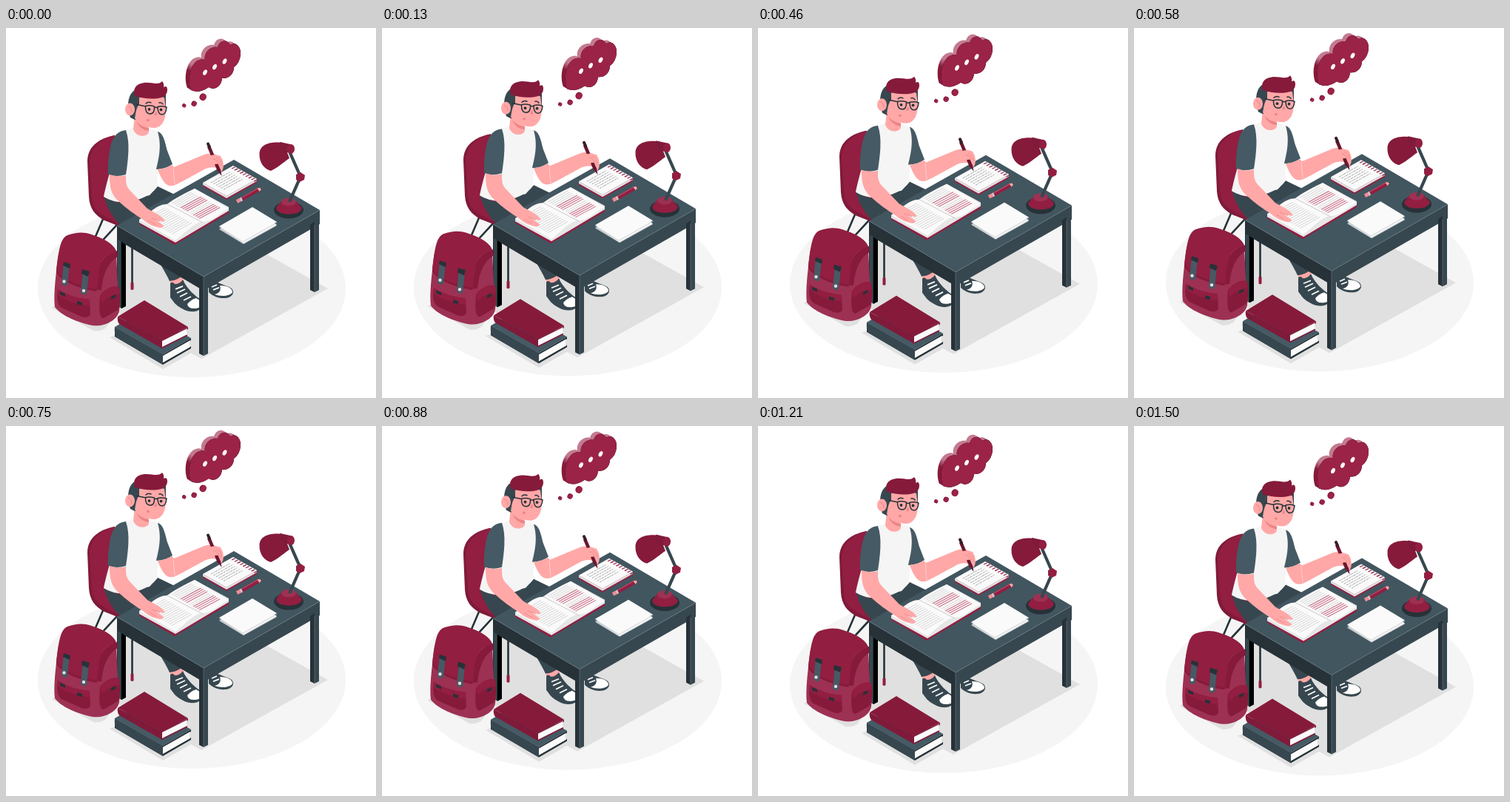
Recreate the animation shown at these times as an HTML page. Size 500 by 500 pixels, loop 1.54 s.

```html
<!DOCTYPE html>
<html lang="en">
<head>
<meta charset="utf-8">
<title>Studying at a desk</title>
<style>
  html, body { margin: 0; width: 100%; height: 100%; overflow: hidden; background: #fff; }
  svg { display: block; width: 100%; height: 100%; }
  .m { fill: #921e41; } .md { fill: #801a3a; } .ml { fill: #9d3153; } .mp { fill: #861a3b; }
  .g { fill: #455a64; } .gd { fill: #37474f; } .k { fill: #263238; }
  .w { fill: #fafafa; } .s { fill: #ffa8a7; } .sh { fill: #e0e0e0; }
  .line { fill: none; stroke: #263238; stroke-linecap: round; stroke-linejoin: round; }
</style>
</head>
<body>
<svg viewBox="0 0 500 500">
<defs>
  <linearGradient id="rim" x2="0" y2="1">
    <stop offset=".48" stop-color="#c47a90"/><stop offset=".62" stop-color="#861a3b"/>
  </linearGradient>
</defs>
<g id="scene">
  <ellipse cx="251" cy="352" rx="208" ry="120" fill="#f5f5f5"/>
  <path class="sh" d="M264 447L435 352 322 289 152 270V385ZM62 378L118 409Q126 411 134 406L172 354 120 340ZM140 418L212 461 254 437 190 400Z"/>

  <!-- chair -->
  <g class="line" stroke-width="2.6"><path d="M132 256L120 284M150 266L126 292M170.5 285V346"/></g>
  <path class="m" d="M168.500 344h4v9q-2 2-4 0Z"/>
  <path class="md" d="M147 145C126 149 110 160 110 180L112 228C113 244 120 253 133 260L156 269 165 240Z"/>
  <path class="m" d="M147 145C128 150 113 162 113 182L116 228C117 242 123 249 136 256L158 267 165 240Z"/>

  <!-- legs and shoes -->
  <path class="gd" d="M132 227L150 236 194 226 205 214 234 228 187 256 153 265Q138 250 132 227Z"/>
  <path class="gd" d="M203 310L233 325 238 337Q230 342 221 342Q216 331 203 310Z"/>
  <path class="s" d="M221 342Q231 341 238 335L240 343 224 348Z"/>
  <path class="gd" d="M274 342L283 342C290 347 300 348 305 352C310 358 305 364 297 365C287 366 279 362 274 357Z"/>
  <path fill="#fff" d="M289 348C300 348 306 352 306 357C303 363 289 363 282 360C289 358 291 354 289 348Z"/>
  <path class="gd" d="M222 345Q225 342 228 346Q235 346 239 340C244 352 256 363 265 368C268 376 263 382 255 383C245 385 233 377 228 372L222 364Z"/>
  <path fill="#fff" d="M245 373Q250 367 257 365L265 370C267 377 260 379 254 379Q246 379 245 373Z"/>
  <path stroke="#fff" stroke-width="1.800" d="M229 353l10-4M231 358l11-5M235 363l10-5M240 368l10-5M278 350l7-3M280 354l8-3"/>

  <!-- torso -->
  <path fill="#f5f5f5" d="M161 139L176 133Q183 142 192 135L206 140C213 155 205 185 204 215C196 226 182 232 166 235Q146 237 132 228C136 209 145 174 161 139Z"/>
  <path class="g" d="M205 140C213 142 215 155 218 166L225 184Q215 191 203 191C206 178 211 160 205 140Z"/>
  <path class="g" d="M162 138C148 140 143 149 140 166Q137 184 138 198Q150 202 162 198C165 178 168 155 162 138Z"/>

  <!-- desk -->
  <path class="k" d="M150 267L267 336V355L162 293V375L156 379 150 375Z"/>
  <path fill="#000" d="M156 289L162 293V376L156 379Z"/>
  <path class="gd" d="M151 286L155 288V378L151 376Z"/>
  <path class="gd" d="M267 336L424 246V265L267 355ZM267 350L273 347V440L267 443ZM417 262L423 259V354L417 357Z"/>
  <path class="k" d="M261 347L267 350V443L261 440ZM411 266L417 262V357L411 354Z"/>
  <path fill="#425660" d="M150 267L308 178 424 246 267 336Z"/>
  <path fill="none" stroke="#6d7d85" stroke-width=".6" d="M150 267L267 336 424 246M267 336V443M417 266V356"/>

  <!-- open book -->
  <path class="m" d="M180 262L255 219 301 246V250L228 293 180 265Z"/>
  <path fill="#e6e6e6" d="M180 259L255 217 301 242V247L229 290 180 263Z"/>
  <path class="w" d="M180 259C194 251 203 238 218 238C228 230 244 222 255 217L301 244C287 251 278 262 266 262C254 262 240 279 229 287Z"/>
  <path fill="none" stroke="#bdbdbd" stroke-width=".8" d="M218 238L266 263"/>
  <g id="pages"></g>

  <!-- loose sheets -->
  <path fill="#c9ced1" d="M288 272L333 245 366 267 321 292Z"/>
  <path fill="#f5f5f5" d="M290 270L334 244 366 266 321 291Z"/>
  <path fill="none" stroke="#c4c8ca" stroke-width=".7" d="M288 269L320 289 366 263"/>
  <path class="w" d="M288 268L333 242 366 262 320 288Z"/>

  <!-- notepad and pencil -->
  <path class="m" d="M266 211L306 188 339 207V209L298 232 266 214Z"/>
  <path fill="#e0e0e0" d="M266 209L298 227 339 204V207L298 230 266 212Z"/>
  <path class="w" d="M266 209L307 186 339 204 298 227Z"/>
  <g id="notes"></g>
  <path stroke="#921e41" stroke-width="5" d="M318 231.500L341 218.500"/>
  <path stroke="#b94f6b" stroke-width="1.300" d="M317 230L340 217"/>
  <path stroke="#ed8d94" stroke-width="5" d="M312 234.500L318 231.500"/>
  <path stroke="#c9d0d3" stroke-width="5" d="M317 232L319 231"/>
  <path class="s" d="M339.500 216.500L347 215.500 342.500 221Z"/>
  <path class="k" d="M343.500 216L347 215.500 345 218Z"/>

  <!-- arms and pen -->
  <path class="s" d="M205 191Q216 190 224 185L227 188 268 171C277 168 287 171 292 177C295 184 294 191 291 195L285 189Q277 187 270 190C255 198 241 206 229 212C217 217 211 207 205 191Z"/>
  <path stroke="#ffd9d8" stroke-width=".8" d="M226 189L228 211"/>
  <path stroke="#6b1730" stroke-width="4.500" d="M274 160L288 193"/>
  <path stroke="#3a1d2b" stroke-width="4" stroke-linecap="round" d="M273 156.500L275 161"/>
  <path fill="#6b1730" d="M286 193L290 191 291.500 200Z"/>
  <path class="s" d="M273 174Q280 169 290 173Q295 181 292 192Q288 189 288 184Q281 183 278 188Q273 186 273 174Z"/>
  <path fill="none" stroke="#ed8587" stroke-width=".8" d="M280 177Q286 178 288 184M284 175Q291 178 291 186"/>
  <path class="s" d="M140 198Q151 202 162 199C162 209 162 214 168 220L191 244C200 249 211 254 215 261Q210 262 202 259L213 267Q213 270 208 270C198 268 192 265 185 259C174 252 163 244 152 234C141 224 140 213 140 198Z"/>
  <path fill="none" stroke="#ed8587" stroke-width=".8" d="M192 260L203 266M197 257L208 261"/>

  <!-- head -->
  <path class="s" d="M174 118L172 137C176 148 190 148 193 141L192 130Z"/>
  <path fill="#ed8587" d="M176 126Q183 134 193 135L193 139Q181 138 176 126Z"/>
  <path class="gd" d="M168 121C163 107 164 90 174 84L216 88V109L208 112 174 124Z"/>
  <path class="s" d="M180 94Q197 88 214 94L216 110C216 124 211 134 201 135C189 135 180 129 174 122Q176 107 180 103Z"/>
  <ellipse class="s" cx="167.500" cy="110" rx="6.500" ry="8.500"/>
  <path fill="none" stroke="#ed8587" d="M165 106Q170 107 170 114"/>
  <path class="mp" d="M174 92C171 83 175 75 187 74C197 73 205 78 211 72Q214 75 213 80Q218 77 218 84Q218 91 210 94C198 97 185 95 174 92Z"/>
  <g class="line">
    <path stroke-width="1.500" d="M189 102Q192 99 196 101M207 101Q210 100 212 103"/>
    <path stroke-width="1.500" d="M177 103.500L189 106M200.500 108Q203 106.500 205 108M188.500 105.500Q194 104 200.500 106Q201 116 195 116Q188 116 188.500 105.500ZM205 106.500Q211 105 217 107Q216 117 211 117Q205 117 205 106.500Z"/>
  </g>
  <circle class="k" cx="193.500" cy="110" r="1.900"/><circle class="k" cx="209.500" cy="110.500" r="1.900"/>
  <path fill="#ed8587" d="M203 112L200 117.500Q202 119 204 117.500Z"/>
  <ellipse fill="#ed8587" cx="192" cy="124.500" rx="2" ry="1.700"/>

  <!-- lamp -->
  <ellipse class="k" cx="382" cy="246" rx="20" ry="11.500"/>
  <path class="m" d="M365 243Q368 239 372 234Q382 227 392 234L400 243C399 254 366 255 365 243Z"/>
  <ellipse class="ml" cx="382" cy="235" rx="10" ry="5.500"/>
  <path fill="none" stroke="#37474f" stroke-width="4.200" d="M383 167L398 201 383 235"/>
  <path class="m" d="M392 198L398 195 404 199 403 205 397 208 392 205Z"/>
  <path class="mp" d="M375 155C359 153 343 156 342.500 170C342 183 350 191 358 193C367 189 374 182 383 176Z"/>
  <path class="md" d="M370 154L384 157 389 166 378 169Q369 164 370 154Z"/>
  <ellipse class="m" cx="385" cy="163.500" rx="5" ry="6.500"/>

  <!-- backpack -->
  <path class="ml" d="M70 312C74 288 84 280 103 278C124 280 146 289 149 303L151 348Q156 360 153 382C151 395 133 404 117 402C97 398 75 389 66 377C64 361 67 337 70 312Z"/>
  <path class="mp" d="M126 323Q130 308 150 301L151 309Q132 320 129 354L122 354Z"/>
  <path class="m" d="M68 327C71 303 73 284 83 280Q97 275 108 277C126 281 147 292 149 302Q128 307 126 324L123 354C107 355 75 344 68 327Z"/>
  <path class="mp" d="M68 327Q81 346 123 353L122 356Q82 349 68 331ZM70 353Q88 365 113 367L114 387Q111 393 102 390L75 378Q67 372 70 353ZM127 362Q140 347 153 350Q156 374 151 381L132 392Q124 393 127 362Z"/>
  <path class="m" d="M70 353Q88 365 113 367V376Q88 373 70 361ZM127 361Q140 346 153 350L154 359Q141 360 129 371Z"/>
  <path class="g" d="M78 317L86 320 83 347Q79 351 75 345ZM104 328L112 331 109 359Q105 363 101 357Z"/>
  <path class="k" d="M78 316L87 319 86 325 77 321ZM103 326L113 329 111 336 102 332ZM73 356l7 3v4l-7-3ZM96 369l7 2v4l-7-2ZM142 363l6-3v4l-6 3Z"/>
  <circle fill="#e0e0e0" cx="78.500" cy="342.500" r="2.200"/><circle fill="#e0e0e0" cx="105" cy="355" r="2.200"/>

  <!-- stacked books -->
  <path class="k" d="M147 404L212 441 250 419V422L212 444V452L250 430V433L212 455 147 417Z"/>
  <path class="gd" d="M147 404L212 441V455L149 418Q146 413 147 404Z"/>
  <path class="w" d="M212 443L249 422Q246 427 249 431L212 452Z"/>
  <path class="g" d="M147 404L183 383 250 419 212 441Z"/>
  <path class="md" d="M151 390L211 422 246 404V407L211 425V431L245 414V416L211 433 153 400Q150 396 151 390Z"/>
  <path class="w" d="M211 423L245 406Q243 410 245 414L211 431Z"/>
  <path class="mp" d="M151 390L187 368 246 404 211 422Z"/>

  <!-- thought cloud -->
  <use href="#cloud" x="-5" y="-3" fill="url(#rim)"/>
  <use href="#cloud" x="-2.5" y="-1.5" fill="url(#rim)"/>
  <path id="cloud" d="M250 84C245 72 248 50 259 44Q265 41 269 43C267 34 276 24 286 26C289 16 299 15 303 23C310 18 318 25 317 36Q316 47 308 53C308 62 301 69 292 68C291 79 282 85 274 80Q261 89 250 84Z"/>
  <use href="#cloud" fill="#9b2347"/>
  <g id="dots" fill="#fff"></g>
  <g id="bubbles"></g>
</g>
</svg>
<script>
  const $ = id => document.getElementById(id);

  // Parallel strokes, each row shifted by (stepX, stepY)
  function rows(id, x, y, dx, dy, stepX, stepY, count, color, width, dash = "none") {
    let d = "";
    for (let i = 0; i < count; i++) d += `M${x + i * stepX} ${y + i * stepY}l${dx} ${dy}`;
    $(id).innerHTML += `<path d="${d}" fill="none" stroke="${color}" stroke-width="${width}" stroke-dasharray="${dash}"/>`;
  }

  rows("pages", 188, 258, 27, -15, 3, 1.7, 13, "#c6c6c6", .7);
  rows("pages", 224, 237, 27, -15, 2.7, 1.55, 5, "#c6c6c6", .7);
  rows("pages", 236, 243, 28, -15, 2.7, 1.55, 4, "#cb718a", 1.1);
  rows("pages", 248, 250, 27, -15, 2.7, 1.55, 2, "#c6c6c6", .7);
  rows("pages", 253, 253, 28, -15, 2.7, 1.55, 4, "#cb718a", 1.1);
  rows("notes", 277, 209, 26, -14.5, 3.4, 1.9, 6, "#8d9092", .8, "3 1 1.5 .8 4 1.2");
  rows("notes", 305, 190, 4.5, -2, 3.8, 2.15, 9, "#921e41", 1.2);

  for (const [x, y] of [[269, 60], [282, 52.5], [295.5, 45]])
    $("dots").innerHTML += `<ellipse cx="${x}" cy="${y}" rx="2.5" ry="4" transform="rotate(28 ${x} ${y})"/>`;

  for (const [x, y, r] of [[266.5, 93.5, 4.8], [254.5, 102.5, 3.6], [241, 105, 2.5]])
    $("bubbles").innerHTML +=
      `<g transform="rotate(30 ${x} ${y})"><ellipse cx="${x - 1}" cy="${y}" rx="${r * .85}" ry="${r}" fill="#861a3b"/>` +
      `<ellipse cx="${x + .4}" cy="${y}" rx="${r * .8}" ry="${r}" fill="#9b2347"/></g>`;

  // Linear float: up to the peak, then back down to rest
  const LOOP = 1540, LEAD = 40, PEAK = 710, REST = 1480, HEIGHT = 10;
  function lift(t) {
    if (t < PEAK) return HEIGHT * (t + LEAD) / (PEAK + LEAD);
    return HEIGHT * Math.max(0, (REST - t) / (REST - PEAK));
  }

  const start = performance.now();
  function draw() {
    const t = (performance.now() - start) % LOOP;
    $("scene").setAttribute("transform", `translate(0 ${.5 - lift(t)})`);
    requestAnimationFrame(draw);
  }
  draw();
</script>
</body>
</html>
```
